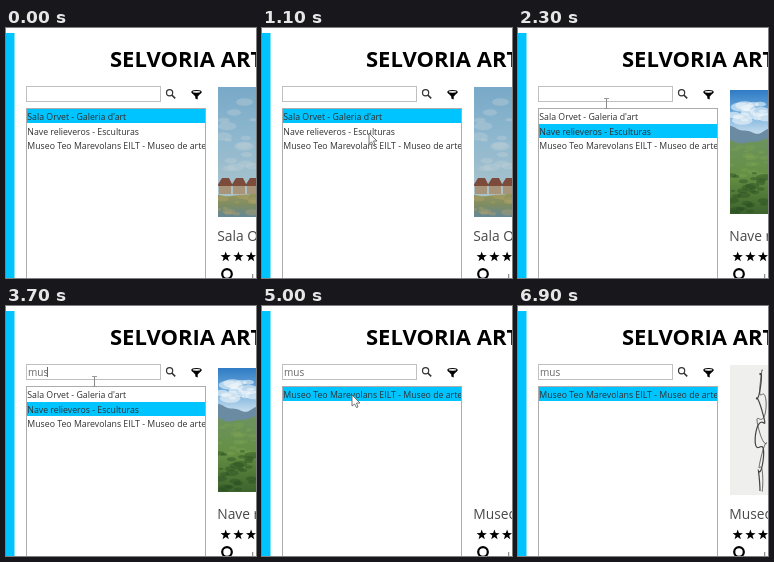
Animation of 250x250 px, one loop 7100 ms. Source, as an HTML page with a canvas:

```html
<!DOCTYPE html>
<html lang="es">
<head>
<meta charset="utf-8">
<title>Gallery search</title>
<style>
  html, body { margin: 0; width: 100%; height: 100%; overflow: hidden; background: #fff; }
  canvas { display: block; width: 100vw; height: 100vh; }
</style>
</head>
<body>
<canvas id="stage" width="250" height="250"></canvas>
<script>
const ctx = document.getElementById('stage').getContext('2d');
const LOOP = 7100, STEP = 100;
const CYAN = '#00c4ff', INK = '#303030';
const FONT = '"Open Sans", "Noto Sans", sans-serif';
const ROW_TOP = 81, ROW_H = 14.5;
const PHOTO_X = 212, PHOTO_W = 38;

// Moments of the story, in ms
const PICK_SECOND = 1300, TYPE = 2800, TYPE_GAP = 250;
const FILTER = 3900, PICK_MUSEUM = 4800, LOAD_MUSEUM = 5300;

const places = [
  { name: 'Sala Orvet', kind: "Galeria d'art", paint: paintVillage },
  { name: 'Nave relieveros', kind: 'Esculturas', paint: paintHill },
  { name: 'Museo Teo Marevolans EILT', kind: 'Museo de arte', paint: paintSketch }
];

// Pointer stops: when it arrives, when it leaves, where it rests
const stops = [
  { from: 100, to: 100, x: 100, y: 250 },
  { from: 1100, to: 1500, x: 107, y: 105 },
  { from: 2000, to: 4500, x: 88, y: 75 },
  { from: 4800, to: 5800, x: 90, y: 89 },
  { from: 6000, to: 6000, x: 92, y: 252 }
];

function seeded(seed) {
  return () => (seed = seed * 16807 % 2147483647) / 2147483647;
}

function text(str, x, y, size, color = INK, weight = 400) {
  ctx.font = `${weight} ${size}px ${FONT}`;
  ctx.fillStyle = color;
  ctx.fillText(str, x, y);
}

function rect(x, y, w, h, color) {
  ctx.fillStyle = color;
  ctx.fillRect(x, y, w, h);
}

function frame(x, y, w, h, color) {
  ctx.strokeStyle = color;
  ctx.lineWidth = 1;
  ctx.strokeRect(x + 0.5, y + 0.5, w - 1, h - 1);
}

function poly(points, color) {
  ctx.beginPath();
  points.forEach(([x, y]) => ctx.lineTo(x, y));
  ctx.closePath();
  ctx.fillStyle = color;
  ctx.fill();
}

function blob(x, y, rx, ry, color) {
  ctx.beginPath();
  ctx.ellipse(x, y, rx, ry, 0, 0, Math.PI * 2);
  ctx.fillStyle = color;
  ctx.fill();
}

function ring(x, y, r, width, color) {
  ctx.beginPath();
  ctx.arc(x, y, r, 0, Math.PI * 2);
  ctx.strokeStyle = color;
  ctx.lineWidth = width;
  ctx.stroke();
}

function fade(y0, y1, ...colors) {
  const g = ctx.createLinearGradient(0, y0, 0, y1);
  colors.forEach((c, i) => g.addColorStop(i / (colors.length - 1), c));
  return g;
}

function clipped(x, y, w, h, draw) {
  ctx.save();
  ctx.beginPath();
  ctx.rect(x, y, w, h);
  ctx.clip();
  draw();
  ctx.restore();
}

function photo(top, height, draw) {
  clipped(PHOTO_X, top, PHOTO_W, height, draw);
}

// Soft patches strewn over a band of the photo
function scatter(seed, count, top, height, size, color) {
  const rnd = seeded(seed);
  for (let i = 0; i < count; i++) {
    const r = size * (0.5 + rnd());
    blob(PHOTO_X + rnd() * PHOTO_W, top + rnd() * height, r, r * 0.45, color);
  }
}

function ridge(y, amp, color) {
  ctx.beginPath();
  ctx.moveTo(PHOTO_X, 250);
  for (let x = PHOTO_X; x <= 250; x++) {
    ctx.lineTo(x, y - amp * Math.sin((x + y) / 8) - amp / 3 * Math.sin(x / 3));
  }
  ctx.lineTo(250, 250);
  ctx.fillStyle = color;
  ctx.fill();
}

function paintVillage() {
  photo(59, 130, () => {
    rect(PHOTO_X, 59, PHOTO_W, 130, fade(59, 165, '#78a9c8', '#8fb8cf', '#a9c3cb'));
    scatter(7, 16, 70, 75, 7, 'rgba(190, 208, 214, .4)');
    for (let i = 0; i < 3; i++) {
      const x = 213 + i * 14;
      rect(x, 157, 12, 9, '#a79479');
      poly([[x - 2, 158], [x + 3, 150], [x + 10, 150], [x + 14, 158]], '#7c4b3b');
    }
    ridge(167, 1, fade(166, 189, '#96965c', '#7d8c62', '#64889a'));
    scatter(19, 12, 168, 18, 5, 'rgba(179, 162, 108, .4)');
  });
}

function paintHill() {
  photo(62, 124, () => {
    rect(PHOTO_X, 62, PHOTO_W, 124, fade(62, 105, '#2f7bc4', '#69a9dc', '#c4dcec'));
    scatter(11, 18, 76, 18, 7, 'rgba(240, 246, 250, .6)');
    ridge(102, 3, '#6b8ba3');
    ridge(113, 2, fade(110, 186, '#6d9360', '#648f43', '#3c632c'));
    scatter(23, 22, 118, 30, 4, 'rgba(126, 163, 82, .4)');
    scatter(31, 28, 145, 42, 5, 'rgba(42, 77, 34, .45)');
  });
}

function paintSketch() {
  photo(59, 130, () => {
    rect(PHOTO_X, 59, PHOTO_W, 130, '#efefed');
    ctx.strokeStyle = '#444';
    for (let k = 0; k < 2; k++) {
      ctx.beginPath();
      for (let y = 62; y < 182; y++) {
        const u = (y - 62) / 120;
        const sway = Math.sin(u * 19 + k * 2) * 5 * Math.sin(u * Math.PI);
        ctx.lineTo(242 + sway + k * 2, y + 5 * Math.cos(u * 31 + k));
      }
      ctx.lineWidth = 1.2 - k * 0.4;
      ctx.stroke();
    }
  });
}

function star(cx, cy, r) {
  const points = Array.from({ length: 10 }, (_, i) => {
    const a = i * Math.PI / 5 - Math.PI / 2;
    const d = i % 2 ? r * 0.4 : r;
    return [cx + d * Math.cos(a), cy + d * Math.sin(a)];
  });
  poly(points, '#000');
}

function drawTools() {
  ring(163.6, 64.8, 3.1, 1.2, '#333');
  ctx.beginPath();
  ctx.moveTo(165.8, 67);
  ctx.lineTo(169.2, 70.4);
  ctx.lineWidth = 1.6;
  ctx.stroke();
  const x = 190.5;
  poly([[x - 5, 64.5], [x + 5, 64.5], [x + 1.2, 68.5], [x + 1.2, 71.5], [x - 1.2, 70.5], [x - 1.2, 68.5]], '#000');
  blob(x, 64, 5.2, 2, '#000');
  blob(x, 63.8, 3.8, 0.9, '#fff');
}

function drawSearch(query, caret) {
  frame(20, 58, 135, 16, '#c0c0c0');
  text(query, 22, 69.5, 10, '#666');
  if (caret) rect(Math.round(22 + ctx.measureText(query).width) - 1, 61, 1, 10, '#666');
}

function drawList(items, selected) {
  frame(20, 80, 180, 180, '#acacac');
  clipped(21, 81, 178, 169, () => items.forEach((p, i) => {
    const y = ROW_TOP + i * ROW_H;
    if (p === selected) rect(21, Math.round(y), 178, 14, CYAN);
    text(`${p.name} - ${p.kind}`, 21.3, y + 11, 8.75);
  }));
}

function drawDetail(place, loaded) {
  if (loaded) place.paint();
  text(place.name, 211.3, 213, 13.8, '#484848');
  for (let i = 0; i < 3; i++) star(219.7 + i * 12.7, 228.8, 5.4);
  ring(221, 246, 4.8, 2.2, '#000');
  text('l', 245.5, 254, 10, '#555');
}

function pointerAt(t) {
  const i = stops.findIndex(s => t < s.to);
  if (i < 1) return null;
  const a = stops[i - 1], b = stops[i];
  const u = Math.min(1, (t - a.to) / (b.from - a.to));
  return [a.x + (b.x - a.x) * u, a.y + (b.y - a.y) * u].map(Math.round);
}

function drawPointer(t) {
  const pos = pointerAt(t);
  if (!pos) return;
  const [x, y] = pos;
  if (y <= 76) {
    rect(x, y - 4, 1, 9, '#888');
    for (const end of [-5, 5]) rect(x - 2, y + end, 5, 1, '#999');
    return;
  }
  poly([[x, y], [x, y + 11], [x + 2.5, y + 9], [x + 4.5, y + 12.5], [x + 6, y + 12], [x + 4.5, y + 8], [x + 8, y + 8]], '#fff');
  ctx.strokeStyle = '#555';
  ctx.lineWidth = 0.8;
  ctx.stroke();
}

function draw(t) {
  const within = (a, b) => t >= a && t < b;
  const typed = t < TYPE ? 0 : 1 + Math.floor((t - TYPE) / TYPE_GAP);
  const caret = within(2500, 4000) || within(4400, 4700);
  const place = places[t < PICK_SECOND ? 0 : t < PICK_MUSEUM ? 1 : 2];
  const loaded = !within(PICK_SECOND, 1500) && !within(PICK_MUSEUM, LOAD_MUSEUM);

  rect(0, 0, 250, 250, '#fff');
  rect(0, 5, 8.5, 245, CYAN);
  text('SELVORIA ART', 104, 38.6, 22, '#000', 700);
  drawSearch('mus'.slice(0, typed), caret);
  drawTools();
  drawList(t < FILTER ? places : places.slice(2), place);
  drawDetail(place, loaded);
  drawPointer(t);
}

const start = performance.now();
function tick() {
  const t = (performance.now() - start) % LOOP;
  draw(Math.floor(t / STEP) * STEP);
  requestAnimationFrame(tick);
}
tick();
</script>
</body>
</html>
```
